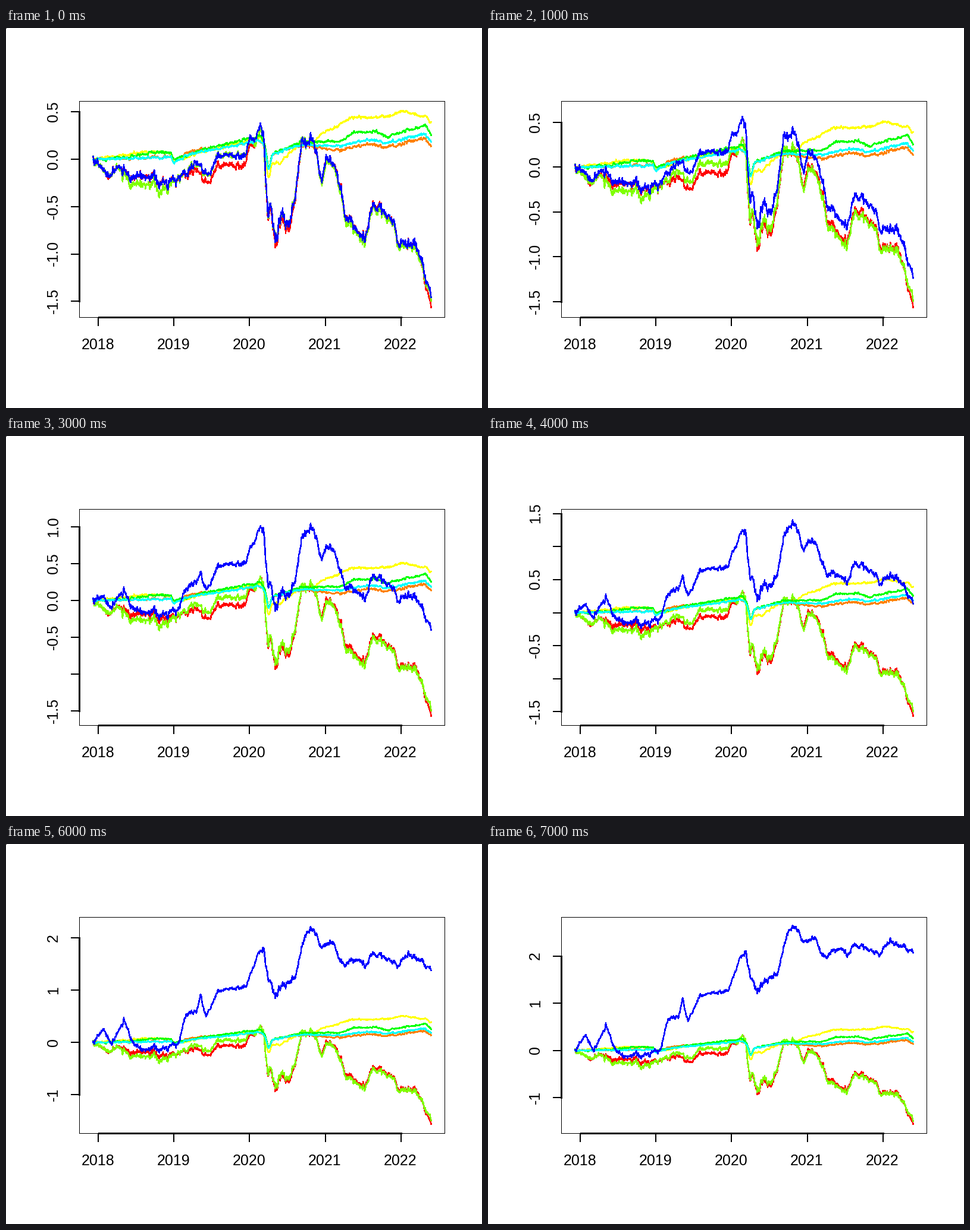
A matplotlib script for the animation above (8000 ms loop, 800 by 640 pixels).

```python
import numpy as np
import matplotlib.pyplot as plt
from matplotlib.animation import FuncAnimation
from matplotlib.patches import Rectangle

W, H, DPI = 800, 640, 80
PT = 72 / DPI                      # points per pixel
FONT = dict(family="Liberation Sans", fontsize=25 * PT, color="black",
            ha="center", va="baseline")
LEFT, RIGHT, TOP, BOTTOM = 123, 737, 123, 487
Y_HI, Y_LO = 137.4, 473.5          # pixel rows of the data maximum and minimum
V_MIN = -1.583
V_MAX = [0.524, 0.643, 0.876, 1.126, 1.44, 1.83, 2.24, 2.65]
STEPS = len(V_MAX)

rng = np.random.default_rng(7)
x = np.linspace(146, 715, 1130)


def curve(*pts):
    return np.interp(x, *zip(*pts))


def bump(centre, width, power=2):
    return np.exp(-np.abs((x - centre) / width) ** power)


def ramp(a, b):
    return np.clip((x - a) / (b - a), 0, 1)


def noise(sigma, keep):
    """Mean-reverting random walk with the given spread."""
    out = np.zeros(x.size)
    kicks = rng.normal(0, sigma * np.sqrt(1 - keep**2), x.size)
    for i in range(1, x.size):
        out[i] = keep * out[i - 1] + kicks[i]
    return out


# The blue line's shape in the first and the last step
start = curve(
    (146, 0.02), (174, -0.16), (190, -0.07), (206, -0.18), (285, -0.23),
    (322, -0.03), (340, -0.2), (357, 0.04), (403, 0.06), (410, 0.23), (420, 0.25),
    (428, 0.43), (434, 0.25), (440, -0.66), (444, -0.48), (455, -0.82), (463, -0.6),
    (475, -0.72), (488, -0.28), (497, 0.17), (516, 0.2), (531, -0.26), (538, 0.02),
    (556, -0.12), (572, -0.6), (603, -0.86), (617, -0.47), (651, -0.67),
    (660, -0.9), (688, -0.85), (715, -1.47))
finish = curve(
    (146, 0), (164, 0.35), (178, 0), (198, 0.52), (215, 0), (228, -0.15), (290, 0),
    (303, 0.7), (320, 0.7), (327, 1.1), (336, 0.6), (357, 1.17), (405, 1.3),
    (424, 2.02), (434, 2.15), (440, 1.55), (455, 1.3), (488, 1.7), (505, 2.57),
    (517, 2.6), (530, 2.28), (550, 2.38), (563, 2.0), (594, 2.18), (604, 2.0),
    (616, 2.25), (658, 2.03), (676, 2.36), (715, 2.07))
jitter = noise(0.024, 0.5) + noise(0.022, 0.9)
jitter *= 0.95 - 0.35 * bump(360, 55, 4) + 0.7 * bump(455, 25)

red = start + jitter + noise(0.008, 0.8) - (
    0.1 * bump(365, 60, 4) + 0.05 * bump(465, 30) + 0.11 * ramp(690, 712))
lime = start + jitter + noise(0.012, 0.8) - (
    0.08 * bump(238, 42, 4) + 0.06 * bump(425, 12) + 0.03 * ramp(500, 530))


def fund(crash, *trend):
    """Slow trend with a winter dip, a spring crash and a little noise."""
    winter = 0.07 * ramp(277, 283) * np.exp(-np.maximum(x - 283, 0) / 14)
    spring = crash * bump(441, 4)
    return curve(*trend) - winter - spring + noise(0.008, 0.7)


yellow = fund(0.2, (146, 0), (250, 0.09), (300, 0.03), (428, 0.23), (443, -0.03),
              (460, -0.04), (495, 0.17), (516, 0.17), (530, 0.26), (580, 0.44),
              (645, 0.45), (666, 0.51), (705, 0.45), (715, 0.38))
green = fund(0.16, (146, 0), (200, 0.01), (250, 0.08), (300, 0.05), (428, 0.25),
             (445, 0.05), (495, 0.18), (565, 0.19), (585, 0.29), (620, 0.29),
             (640, 0.24), (705, 0.36), (715, 0.25))
cyan = fund(0.18, (146, 0), (276, 0.02), (428, 0.2), (445, 0.05), (495, 0.15),
            (560, 0.14), (615, 0.21), (640, 0.17), (705, 0.27), (715, 0.17))
orange = cyan + noise(0.004, 0.8) + 0.025 * bump(320, 40) - 0.045 * ramp(490, 560)


def blue(step):
    # The later part of the series catches up more slowly.
    share = (step / (STEPS - 1)) ** (1.13 + 0.29 * ramp(432, 562) ** 0.6)
    return np.minimum(start + jitter + share * (finish - start), V_MAX[step])


fig = plt.figure(figsize=(W / DPI, H / DPI), dpi=DPI, facecolor="white")
ax = fig.add_axes([0, 0, 1, 1])
ax.set_xlim(0, W)
ax.set_ylim(H, 0)
ax.axis("off")


def stroke(xs, ys, width, color="black"):
    return ax.plot(xs, ys, color=color, lw=width * PT, antialiased=False,
                   solid_capstyle="butt", solid_joinstyle="round")[0]


fixed = [(red, "#ff0000"), (orange, "#ff8000"), (yellow, "#ffff00"),
         (lime, "#80ff00"), (green, "#00ff00"), (cyan, "#00ffff")]
lines = [(np.clip(v, V_MIN, None), stroke(x, v, 1.5, c)) for v, c in fixed]
blue_line = stroke(x, start, 1.5, "#0000ff")

ax.add_patch(Rectangle((LEFT, TOP), RIGHT - LEFT, BOTTOM - TOP, fill=False,
                       ec="black", lw=PT, antialiased=False))
ax.add_patch(Rectangle((0, 0), 1, 1, fc="black", lw=0, antialiased=False))

stroke([154.5, 665], [BOTTOM, BOTTOM], 3)
for i in range(5):
    tx = 155 + 127.2 * i
    stroke([tx, tx], [BOTTOM, 502], 2)
    ax.text(tx - 0.8, 541, str(2018 + i), **FONT)

y_axis = stroke([LEFT, LEFT], [0, 0], 3)
y_ticks = [stroke([108.5, LEFT], [0, 0], 2) for _ in range(7)]
y_labels = [ax.text(87, 0, "", rotation=90, rotation_mode="anchor", **FONT)
            for _ in range(7)]


def draw_axis(row, top):
    gap = 0.5 if top < 2 else 1
    pad = 0.04 * (top - V_MIN)
    ticks = gap * np.arange(np.ceil((V_MIN - pad) / gap), (top + pad) / gap)
    y_axis.set_ydata([row(ticks[0]) + 1, row(ticks[-1]) - 1])

    free = H                       # lowest row still open for a label
    for i, (tick, label) in enumerate(zip(y_ticks, y_labels)):
        shown = i < len(ticks)
        tick.set_visible(shown)
        label.set_text("")
        if not shown:
            continue
        v, y = ticks[i], row(ticks[i])
        tick.set_ydata([y, y])
        half = ((35 if gap < 1 else 14) + (8 if v < 0 else 0)) / 2
        if y + half <= free:
            label.set_text(f"{v:.1f}" if gap < 1 else f"{v:.0f}")
            label.set_y(y - 0.8)
            free = y - half - 21.2


def draw(step):
    top = V_MAX[step]
    unit = (Y_LO - Y_HI) / (top - V_MIN)

    def row(v):
        return Y_LO - (v - V_MIN) * unit

    for values, line in lines:
        line.set_ydata(row(values))
    blue_line.set_ydata(row(blue(step)))
    draw_axis(row, top)
    return []


anim = FuncAnimation(fig, draw, frames=STEPS, interval=1000, repeat=True,
                     repeat_delay=0, init_func=lambda: draw(0))
plt.show()
```
